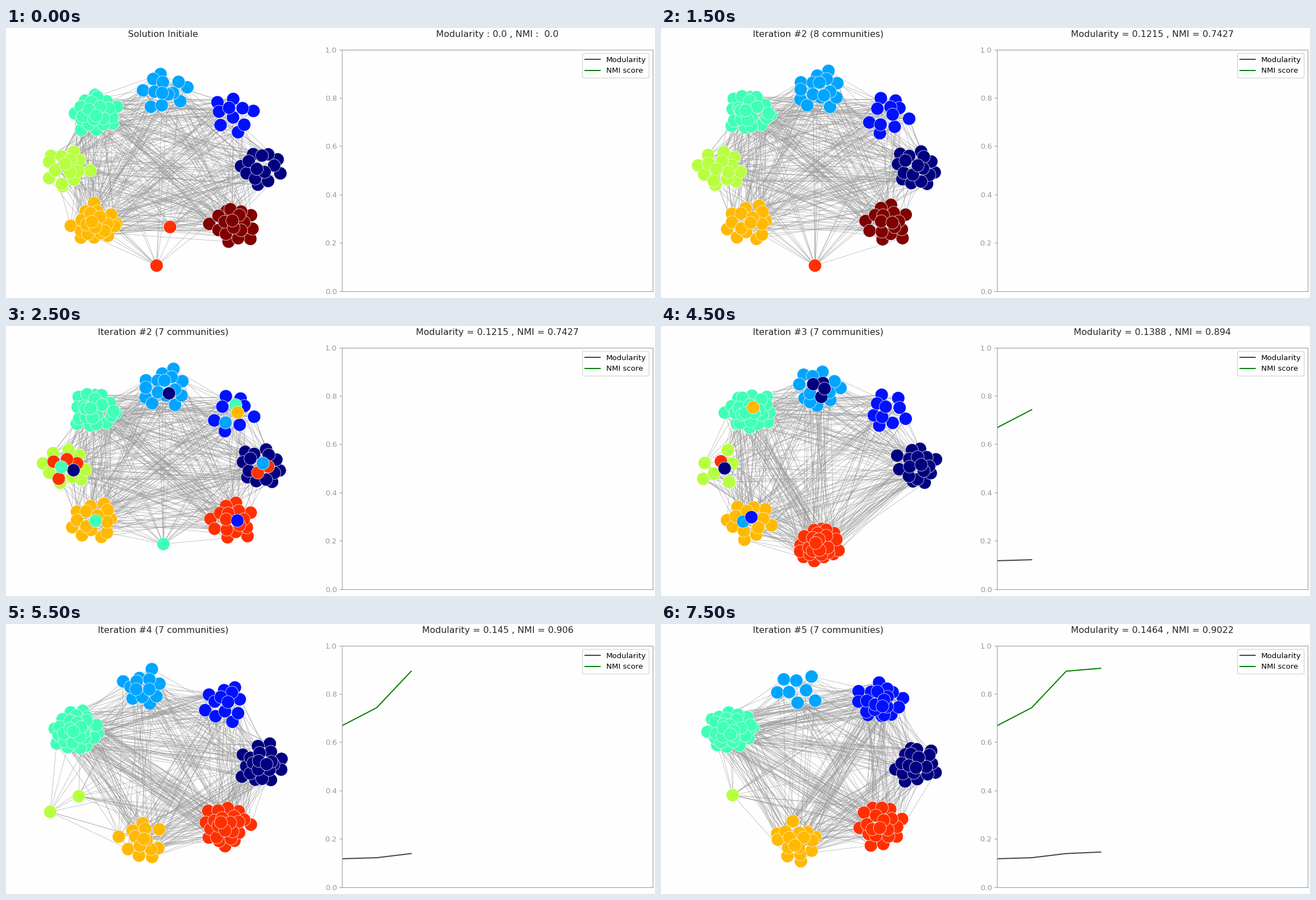
A matplotlib script that plays this animation: 1159x483 px, repeating every 8000 ms.

```python
import numpy as np
import matplotlib.pyplot as plt
from matplotlib.animation import FuncAnimation
from matplotlib.collections import LineCollection

W, H, DPI = 1159, 483, 96
GREY, INK, PAPER = "#999999", "#262626", "#fefefe"
CENTRE, ORBIT, SPREAD = (282, 251), (175, 140), (41, 35)
GOLDEN = np.pi * (3 - np.sqrt(5))
COLOURS = plt.cm.jet(np.linspace(0, 1, 8))
NAVY, BLUE, SKY, AQUA, LIME, AMBER, RED, MAROON = range(8)


def ellipse(centre, radii, r, angle):
    """Points at relative radius r and angle, with y pointing down."""
    ring = np.column_stack([r * np.cos(angle), -r * np.sin(angle)])
    return np.array(centre) + np.array(radii) * ring


def community(k, size, slots, seed):
    """A jittered sunflower disc on the orbit, outer nodes first."""
    rng = np.random.default_rng([seed, k])
    hub = ellipse(CENTRE, ORBIT, 1, np.array([2 * np.pi * k / slots]))[0]
    i = np.arange(size)[::-1]
    angle = GOLDEN * i + rng.uniform(0, 2 * np.pi)
    disc = ellipse(hub, SPREAD, np.sqrt((i + 0.5) / size), angle)
    return disc + rng.normal(0, 3, disc.shape)


def link(a, b, i, j):
    """Seeded edges; small communities are linked more densely."""
    density = 0.06 + 0.1 / min(len(a), len(b))
    if (i, j) == (BLUE, AMBER):
        density += 0.08
    hit = np.random.default_rng([i, j]).random((len(a), len(b))) < density
    return [(a[m], b[n]) for m, n in np.argwhere(hit)]


def graph(sizes, slots, seed, lone=None, strays=None, tint=None):
    """Nodes, colours and edges.

    lone places tiny communities, strays recolours the innermost nodes
    of a community and tint recolours a whole community.
    """
    lone, strays, tint = lone or {}, strays or {}, tint or {}
    groups, tones = [], []
    for k, size in enumerate(sizes):
        if k in lone:
            groups.append(np.array(lone[k], float))
        else:
            groups.append(community(k, size, slots, seed))
        moved = list(strays.get(k, ()))
        tones += [tint.get(k, k)] * (size - len(moved)) + moved
    edges = [e for i in range(len(groups)) for j in range(i, len(groups))
             for e in link(groups[i], groups[j], i, j)]
    return np.concatenate(groups), COLOURS[tones], edges


FIRST = dict(sizes=(14, 10, 13, 22, 15, 21, 2, 18), slots=8, seed=1,
             lone={RED: [(269, 425), (293, 356)]})
SECOND = dict(sizes=(17, 11, 16, 22, 15, 16, 1, 17), slots=8, seed=2)
THIRD = dict(sizes=(17, 10, 16, 24, 8, 15, 25), slots=8, seed=3)
FOURTH = dict(sizes=(21, 13, 13, 28, 2, 14, 24), slots=7, seed=4,
              lone={LIME: [(130, 308), (79, 336)]})
FIFTH = dict(sizes=(19, 21, 8, 29, 1, 17, 20), slots=7, seed=5,
             lone={LIME: [(128, 306)]})

STATES = [
    graph(**FIRST),
    graph(**FIRST, strays={
        SKY: (AQUA,), AQUA: (SKY,), LIME: (AMBER,), AMBER: (LIME, NAVY),
        RED: (AMBER,), MAROON: (BLUE, NAVY)}),
    graph(**SECOND, lone={RED: [(275, 425)]}),
    graph(**SECOND, lone={RED: [(281, 390)]}, tint={MAROON: RED}, strays={
        NAVY: (RED, RED, SKY), BLUE: (SKY, AQUA, AMBER), SKY: (NAVY,),
        LIME: (RED, RED, RED, RED, NAVY, AQUA), AMBER: (AQUA,),
        RED: (AQUA,), MAROON: (BLUE,)}),
    graph(**THIRD),
    graph(**THIRD, strays={
        SKY: (NAVY, NAVY, NAVY, NAVY), AQUA: (AMBER,),
        LIME: (RED, NAVY), AMBER: (SKY, BLUE)}),
    graph(**FOURTH),
    graph(**FOURTH, strays={
        NAVY: (RED,), BLUE: (NAVY,), SKY: (AQUA, BLUE, BLUE),
        LIME: (AQUA,), AMBER: (AQUA,), RED: (AMBER,)}),
    graph(**FIFTH),
]
ITERATION = [0, 1, 2, 2, 3, 3, 4, 4, 5]
MODULARITY = [0.1173, 0.1215, 0.1388, 0.145, 0.1464]
NMI = [0.6685, 0.7427, 0.894, 0.906, 0.9022]

fig = plt.figure(figsize=(W / DPI, H / DPI), dpi=DPI, facecolor=PAPER)
net = fig.add_axes([0, 0, 1, 1])
net.set(xlim=(0, W), ylim=(H, 0))
net.axis("off")
wires = net.add_collection(
    LineCollection([], colors=GREY, linewidths=0.4, zorder=1))
dots = net.scatter([], [], s=300, edgecolors="white", linewidths=0.5, zorder=2)
caption = net.text(281, 16, "", size=12, color=INK, ha="center")
scores = net.text(877.8, 16, "", size=12, color=INK, ha="center")

left, right, top, bottom = 600.3, 1155.1, 38.6, 470.6
chart = fig.add_axes([left / W, 1 - bottom / H,
                      (right - left) / W, (bottom - top) / H], facecolor=PAPER)
chart.set(xlim=(1, 10), ylim=(0, 1), xticks=[])
chart.tick_params(color=GREY, labelcolor=GREY)
chart.spines[:].set_color(GREY)
mod_line, = chart.plot([], [], color="#444444", label="Modularity")
nmi_line, = chart.plot([], [], color="green", label="NMI score")
chart.legend(loc="upper right")


def draw(frame):
    step = (frame + 1) // 2
    nodes, tones, edges = STATES[step]
    dots.set_offsets(nodes)
    dots.set_facecolor(tones)
    wires.set_segments(edges)

    k = ITERATION[step]
    if k:
        count = 8 if step < 3 else 7
        caption.set_text(f"Iteration #{k} ({count} communities)")
        scores.set_text(f"Modularity = {MODULARITY[k - 1]} , NMI = {NMI[k - 1]}")
    else:
        caption.set_text("Solution Initiale")
        scores.set_text("Modularity : 0.0 , NMI :  0.0")
    done = max(k - 1, 0)
    x = range(1, done + 1)
    mod_line.set_data(x, MODULARITY[:done])
    nmi_line.set_data(x, NMI[:done])
    return dots, wires, caption, scores, mod_line, nmi_line


anim = FuncAnimation(fig, draw, frames=16, interval=500, repeat=True)
plt.show()
```
